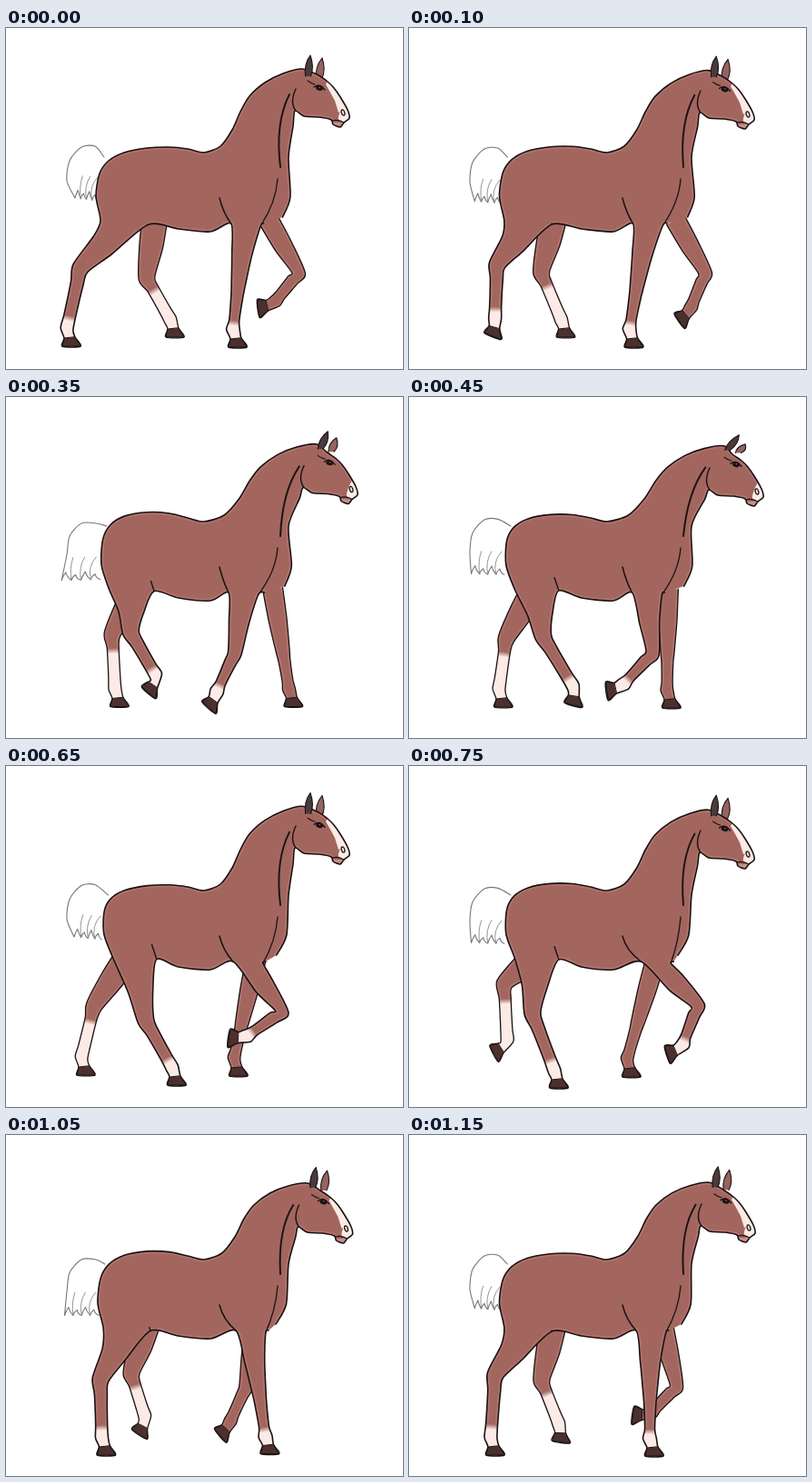
An HTML page with a canvas that plays this animation: 437x375 px, repeating every 1.25 s.

```html
<!DOCTYPE html>
<html lang="en">
<head>
<meta charset="utf-8">
<title>Walking horse</title>
<style>
html, body { margin: 0; width: 100%; height: 100%; overflow: hidden; background: #fff; }
canvas { display: block; width: 437px; height: 375px; }
</style>
</head>
<body>
<canvas id="stage" width="437" height="375"></canvas>
<script>
const ctx = document.getElementById("stage").getContext("2d");
const COAT = "#a2665f", INK = "#1a1213", SOCK = "#fbeae5", HOOF = "#4b302e";

// One loop holds 13 drawings; the second one is short.
const LOOP = 1250, COUNT = 13;
const drawingAt = t => t < 100 ? 0 : t < 150 ? 1 : 2 + Math.floor((t - 150) / 100);

// Key drawings; the rest are blended.
const keyAt = [0, 3, 5, 7, 8, 10, 12];

// Hind legs: hock, fetlock, hoof curl in degrees.
const nearHind = [[82,264, 67,331, 0], [127,254, 150,296, 65], [148,264, 181,319, 15], [154,280, 183,332, 0],
  [136,272, 160,335, 0], [113,274, 121,333, 0], [95,264, 90,333, 0]];
const farHind = [[155,275, 181,321, 0], [127,256, 141,321, 0], [107,266, 99,322, 0], [97,264, 83,321, 0],
  [105,240, 108,303, 62], [130,255, 141,303, 58], [146,270, 165,318, 8]];
// Forelegs: fetlock and hoof curl; the knee is solved from bone lengths.
const nearFore = [[250,332, 0], [228,332, 0], [236,316, 82], [265,297, 98], [301,307, 72], [306,329, 0], [265,334, 0]];
const farFore = [[296,301, 82], [339,320, 0], [284,323, 0], [251,322, 0], [240,323, 0], [228,323, 0], [266,306, 98]];
const headShift = [[0,0], [6,6], [12,11], [0,-1], [2,4], [4,11], [3,9]];

const headShape = [[318,91], [328,97], [345,98], [358,101], [360,106], [368,109], [372,104],
  [378,99], [376,90], [368,76], [361,66], [354,59], [344,52]];
const crest = [[326,45], [305,50], [285,60], [268,75], [258,92], [249,112], [236,130], [218,137]];
const back = [[200,133], [180,131], [155,132], [130,137], [113,146], [103,160], [99,185]];
const hoofShape = [[-3,10], [-5,19], [15,19], [9,9]];

const mid = (a, b, u = .5) => a.map((v, i) => v + (b[i] - v) * u);
const add = (p, x, y) => [p[0] + x, p[1] + y];
const clamp = v => Math.min(1, Math.max(0, v));
const wave = turns => .5 - .5 * Math.cos(turns * 2 * Math.PI);

function blend(track, frame) {
  let k = 0;
  while (k < keyAt.length - 2 && frame >= keyAt[k + 1]) k++;
  return mid(track[k], track[k + 1], (frame - keyAt[k]) / (keyAt[k + 1] - keyAt[k]));
}

function smooth(pts, bend = .135) {
  const path = new Path2D(), last = pts.length - 1;
  path.moveTo(...pts[0]);
  for (let i = 0; i < last; i++) {
    const a = pts[Math.max(i - 1, 0)], b = pts[i], c = pts[i + 1], d = pts[Math.min(i + 2, last)];
    path.bezierCurveTo(b[0] + (c[0] - a[0]) * bend, b[1] + (c[1] - a[1]) * bend,
      c[0] - (d[0] - b[0]) * bend, c[1] - (d[1] - b[1]) * bend, ...c);
  }
  return path;
}

function poly(pts) {
  const path = new Path2D();
  pts.forEach(p => path.lineTo(...p));
  path.closePath();
  return path;
}

function fill(path, color) {
  ctx.fillStyle = color;
  ctx.fill(path);
}

function ink(path, width = 1.5, color = INK) {
  ctx.strokeStyle = color;
  ctx.lineWidth = width;
  ctx.stroke(path);
}

function curve(a, c, b, width, color) {
  const path = new Path2D();
  path.moveTo(...a);
  path.quadraticCurveTo(...c, ...b);
  ink(path, width, color);
}

function glow(path) {
  ctx.save();
  ctx.clip(path);
  ink(path, 5, "rgba(236,172,162,.2)");
  ctx.restore();
}

// Knee in front of the line from shoulder to fetlock.
function solveKnee(hip, fet, upper, lower) {
  const dx = fet[0] - hip[0], dy = fet[1] - hip[1], d = Math.hypot(dx, dy);
  if (d >= upper + lower) return mid(hip, fet, upper / (upper + lower));
  const along = (upper * upper - lower * lower + d * d) / (2 * d);
  const out = Math.sqrt(Math.max(0, upper * upper - along * along));
  return add(hip, (dx * along + dy * out) / d, (dy * along - dx * out) / d);
}

// Wraps an outline of given half widths around hip, knee and fetlock.
function makeLeg(hip, knee, fet, curl, widths) {
  const chain = [hip, mid(hip, knee), knee, mid(knee, fet, .25), mid(knee, fet, .78), fet];
  const unit = (a, b) => {
    const x = b[0] - a[0], y = b[1] - a[1], l = Math.hypot(x, y) || 1;
    return [x / l, y / l];
  };
  const rear = [], front = [];
  chain.forEach((p, i) => {
    const before = unit(chain[Math.max(i - 1, 0)], chain[Math.max(i, 1)]);
    const after = unit(chain[Math.min(i, 4)], chain[Math.min(i + 1, 5)]);
    const [x, y] = unit([0, 0], [before[0] + after[0], before[1] + after[1]]);
    rear.push(add(p, -y * widths[i], x * widths[i]));
    front.push(add(p, y * widths[i], -x * widths[i]));
  });
  const c = Math.cos(curl * Math.PI / 180), s = Math.sin(curl * Math.PI / 180);
  const hoof = hoofShape.map(([x, y]) => add(fet, x * c - y * s, x * s + y * c));
  const outline = from => [...rear.slice(from), ...hoof, ...front.slice(from).reverse()];
  return { chain, hoof, outline };
}

function drawSock(leg, from) {
  const a = leg.chain[from], b = leg.chain[5], len = Math.hypot(b[0] - a[0], b[1] - a[1]);
  const fade = ctx.createLinearGradient(...a, ...mid(a, b, 6 / len));
  fade.addColorStop(0, COAT);
  fade.addColorStop(1, SOCK);
  fill(smooth(leg.outline(from)), fade);
}

function drawHoof(leg) {
  const path = poly(leg.hoof);
  fill(path, HOOF);
  ink(path, 1);
}

function drawFarLeg(leg, sockFrom) {
  const path = smooth(leg.outline(0));
  fill(path, COAT);
  glow(path);
  if (sockFrom) drawSock(leg, sockFrom);
  ink(path, 1.3);
  drawHoof(leg);
}

// The tail swings out and hangs lower as the croup rises.
function drawTail(lift, sway) {
  const tip = [76 - 17 * lift, 187 + 17 * lift];
  const end = [101 + sway * .5, 190 + 12 * lift];
  const edge = [[108 + sway * .5, 142], [98, 130 + 10 * lift], [83, 131 + 9 * lift],
    [70, 146 + 8 * lift], [67, 168 + 6 * lift], tip];
  const hair = smooth(edge);
  const locks = 4;
  for (let i = 0; i < locks; i++) {
    const a = mid(tip, end, i / locks), b = mid(tip, end, (i + 1) / locks);
    const notch = add(mid(a, b, .35), 1, -9 + i % 2 * 3);
    hair.quadraticCurveTo(a[0] + 1, a[1] - 4, ...notch);
    hair.quadraticCurveTo(notch[0] + 1, notch[1] + 5, ...b);
  }
  fill(hair, "#fff");
  ink(hair, 1.1, "#77777a");
  for (let i = 1; i < locks; i++) {
    const a = mid(tip, end, i / locks);
    curve(a, add(a, -1 - i, -14), add(a, i * 2, -25), .9, "#88888b");
  }
}

function drawEar(base, tip, w, color) {
  const path = new Path2D(), [x, y] = base, m = mid(base, tip);
  path.moveTo(x - w * .7, y);
  path.quadraticCurveTo(m[0] - w * 1.7, m[1] - 2, ...tip);
  path.quadraticCurveTo(m[0] + w * 1.8, m[1] + 2, x + w, y);
  fill(path, color);
  ink(path, 1.1);
}

function drawMuzzle(at, blaze) {
  if (blaze > 0) {
    const rim = [[354,59], [361,66], [368,76], [375,88]];
    const inner = [[366,93], [362,80], [356,69], [352,62]].map((p, i) => mid(rim[3 - i], p, blaze));
    fill(poly([...rim, ...inner].map(at)), SOCK);
  }
  fill(smooth([[372,83], [376,90], [378,99], [372,104], [366,100], [368,91], [372,83]].map(at)), SOCK);
  fill(poly([[361,104], [371,104], [368,108], [361,106]].map(at)), "#c98f88");
}

function drawFace(at, eye) {
  const p = (x, y) => at([x, y]);
  curve(p(319, 67), p(312, 82), p(319, 91), 1.4);
  curve(p(359, 102), p(366, 100), p(372, 104), 1.1);
  const nostril = new Path2D(), iris = new Path2D();
  nostril.ellipse(...p(371, 93), 1.7, 3.2, -.3, 0, 7);
  ink(nostril, 1.3);
  iris.ellipse(...eye, 4, 2.8, .25, 0, 7);
  fill(iris, INK);
  curve(add(eye, -6, -1), add(eye, 0, -6), add(eye, 6, 2), 1.3);
  curve(add(eye, -13, -8), add(eye, -9, -5), add(eye, -5, -4), 1.1);
  fill(poly([add(eye, -1, -1), add(eye, 1, -1), add(eye, 1, .5)]), "#6f9295");
}

function draw(frame) {
  const lift = wave(2 * frame / COUNT), sway = 9 * wave(frame / COUNT);
  const [dx, dy] = blend(headShift, frame);
  const at = p => add(p, dx, dy);
  const tilt = dx * dx / 14;

  // Hind legs
  const buttock = [104 + 1.6 * sway, 212], flank = [157 + sway, 216 - .4 * sway];
  const nh = blend(nearHind, frame), fh = blend(farHind, frame);
  const hindLeg = makeLeg(mid(buttock, flank), [nh[0], nh[1]], [nh[2], nh[3]], nh[4], [26, 14, 9, 7, 6.5, 7]);
  const hindFar = makeLeg([142 + .28 * (fh[2] - 100), 204], [fh[0], fh[1]], [fh[2], fh[3]], fh[4], [14, 13, 9, 6.5, 6.5, 7]);

  // Forelegs
  const nf = blend(nearFore, frame), ff = blend(farFore, frame);
  const elbow = [266 + .15 * (nf[0] - 266), 215], shoulder = [286 + .3 * (ff[0] - 286), 211];
  const foreLeg = makeLeg(elbow, solveKnee(elbow, nf, 67, 47), nf.slice(0, 2), nf[2], [16, 11, 7.5, 6.5, 5.5, 7.5]);
  const foreFar = makeLeg(shoulder, solveKnee(shoulder, ff, 67, 41), ff.slice(0, 2), ff[2], [11, 10, 7.5, 6.5, 6, 7]);
  const rearTop = add(elbow, -16, 0), frontTop = add(elbow, 17, 2);

  // The crest stretches with the head, the croup rises and rocks.
  const top = [
    ...crest.map((p, i) => add(p, dx * 1.7 * (1 - (i / 7) ** 2), dy * .8 * Math.max(0, 1 - i / 4))),
    ...back.map((p, i) => add(p, sway * (i / 6) ** 3, -7 * lift * Math.sin(Math.PI * i / 6)))
  ];
  const reach = (shoulder[0] - 286) * .5;
  const chest = [[303 + reach, 208], [312 + reach * .6, 186], [311, 142], [316 + dx * .8, 108 + dy * .4]];
  const body = smooth([
    ...chest, ...headShape.map(at), ...top, buttock, ...hindLeg.outline(1), flank,
    [190, 221], [225, 224], rearTop, ...foreLeg.outline(1), frontTop,
    [Math.max(frontTop[0] + 3, shoulder[0] - 9), 215]
  ]);

  ctx.fillStyle = "#fff";
  ctx.fillRect(0, 0, 437, 375);
  drawTail(lift, sway);
  drawFarLeg(hindFar, 3);
  drawFarLeg(foreFar);

  const poll = add([332, 53], dx * 1.5, dy * .5);
  drawEar(add(poll, 12, 3), add(poll, 16 + tilt * .4, -20 + tilt * 1.3), 3.6, "#96635e");
  fill(body, COAT);
  glow(body);
  drawSock(hindLeg, 4);
  drawSock(foreLeg, 4);
  drawMuzzle(at, clamp((6.5 - dx) / 2));
  ink(body, 1.6);
  drawHoof(hindLeg);
  drawHoof(foreLeg);
  drawEar(poll, add(poll, 3 + tilt, -23 + tilt * .6), 3.4, "#493b3b");
  drawFace(at, [345 + 1.25 * dx, 66 + .75 * dy]);

  // Creases of neck, breast, shoulder and flank
  curve([312 + 1.2 * dx, 73 + .4 * dy], [296 + .9 * dx, 104], [302, 153], 1.9);
  curve([299, 166], [297, 192], frontTop, 1.3);
  curve([235, 187], [239, 203], rearTop, 1.5);
  const fold = add(flank, -.6 * sway, -1.8 * sway);
  curve(fold, mid(fold, flank), flank, 1.4);
}

ctx.lineJoin = ctx.lineCap = "round";
const begin = performance.now();
function tick() {
  draw(drawingAt((performance.now() - begin) % LOOP));
  requestAnimationFrame(tick);
}
tick();
</script>
</body>
</html>
```
